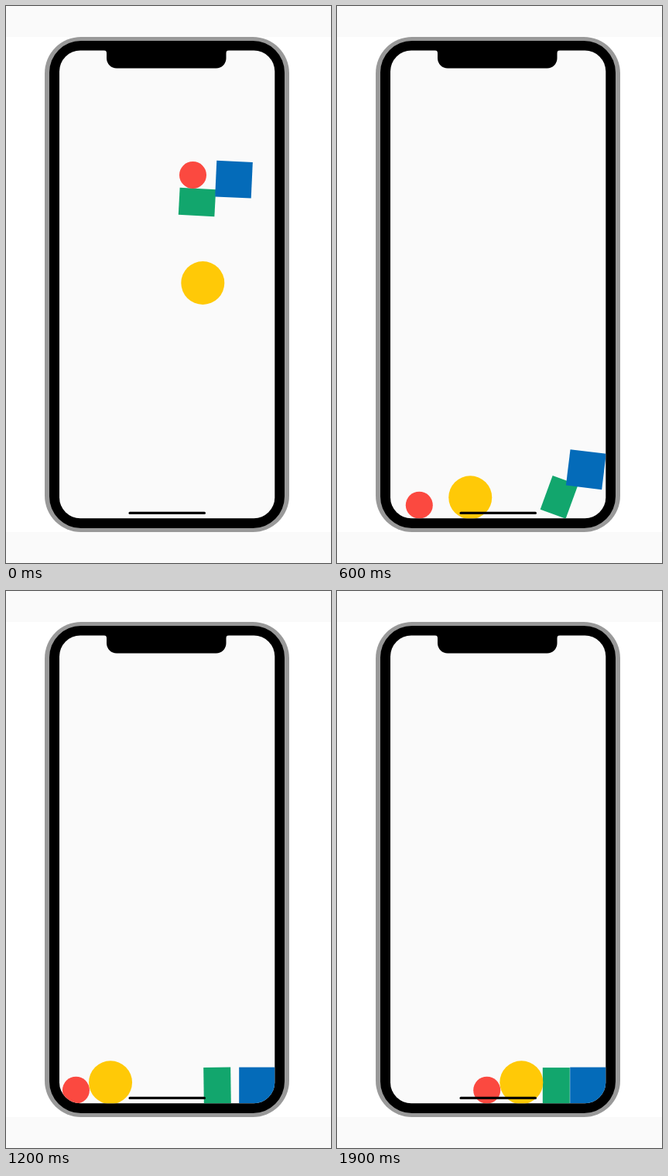
Recreate the animation shown at these times as an HTML page with a canvas. Size 420 by 720 pixels, loop 2000 ms.

```html
<!DOCTYPE html>
<html lang="en">
<head>
<meta charset="utf-8">
<title>Falling shapes</title>
<style>
  html, body { margin: 0; width: 100%; height: 100%; overflow: hidden; background: #fff; }
  canvas { display: block; width: 420px; height: 720px; }
</style>
</head>
<body>
<canvas id="stage" width="420" height="720"></canvas>
<script>
const ctx = document.getElementById("stage").getContext("2d");
const LOOP = 2000, STEP = 100;
const PAPER = "#fafafa";
const LEFT = 69, RIGHT = 347.8, FLOOR = 662.7;
const SIDE = 46.6, SHORT = 35, SMALL = 17.5, BIG = 28;

// Progress from a to b, clamped; the power shapes the start
const ramp = (t, a, b, power = 1) =>
  Math.min(1, Math.max(0, (t - a) / (b - a))) ** power;
const easeOut = (t, a, b) => 1 - (1 - ramp(t, a, b)) ** 2;

// Distance fallen after t steps
const fall = t => 132 * t + 15.3 * t * t;

// Half the extent of a turned block along the axis its width w lies on
function reach(w, h, degrees) {
  const a = degrees * Math.PI / 180;
  return (w * Math.abs(Math.cos(a)) + h * Math.abs(Math.sin(a))) / 2;
}

// The balls roll as a pair: slowing into the left wall, then away with the tilt
function rollX(t) {
  const d = t - 10.35, wall = LEFT + SMALL;
  return Math.min(wall + (d < 0 ? 2.34 : 1.445) * d * d, 193.7);
}

function redPose(t) {
  const rest = FLOOR - SMALL, hit = 543.7;
  const y = t < 2 ? 218.5 + fall(t) : hit + (rest - hit) * easeOut(t, 2, 4.55);
  if (t >= 8) return [rollX(t), y];
  const bounce = Math.max(0, t - 4);
  const x = 241.5 + 14 * ramp(t, 0, 2) - 162.9 * ramp(t, 2, 4)
    + 12 * bounce - 2.575 * bounce ** 2;
  return [x, y];
}

function yellowPose(t) {
  const y = Math.min(358 + fall(t), FLOOR - BIG + 0.6);
  if (t >= 8) return [rollX(t) + 44.6, y];
  const slide = Math.max(0, t - 2);
  return [254.3 + 39.3 * ramp(t, 0, 2) - 41.3 * slide + 2.74 * slide ** 2, y];
}

function greenPose(t) {
  const push = ramp(t, 18, 19);
  const angle = 3 + 47.7 * ramp(t, 0, 2, 2) + 66.3 * ramp(t, 2, 4)
    - 27.8 * ramp(t, 4, 8, 2) + 0.8 * push;
  const x = 247 + 64.8 * ramp(t, 0, 2) - 10.6 * ramp(t, 2, 4)
    - 28.2 * ramp(t, 4, 8) + 10.3 * push;
  const y = Math.min(253.5 + 1.025 * fall(t), FLOOR - reach(SHORT, SIDE, angle));
  return [x, y, angle];
}

function bluePose(t) {
  const angle = 2.6 * (1 - ramp(t, 0, 2)) + 9.3 * (ramp(t, 2, 4) - ramp(t, 4, 8, 2));
  const x = Math.min(294.5 + 15.3 * t, RIGHT - reach(SIDE, SIDE, angle));
  const y = 224.2 + 0.858 * fall(Math.min(t, 2))
    + 82.7 * easeOut(t, 2, 4) + 53 * ramp(t, 4, 8, 2);
  return [x, y, angle];
}

function fillBox(x, y, w, h, r, color) {
  ctx.fillStyle = color;
  ctx.beginPath();
  ctx.roundRect(x, y, w, h, r);
  ctx.fill();
}

function ball([x, y], r, color) {
  ctx.fillStyle = color;
  ctx.beginPath();
  ctx.arc(x, y, r, 0, Math.PI * 2);
  ctx.fill();
}

function block([x, y, angle], w, h, color) {
  ctx.save();
  ctx.translate(x, y);
  ctx.rotate(angle * Math.PI / 180);
  ctx.fillStyle = color;
  ctx.fillRect(-w / 2, -h / 2, w, h);
  ctx.restore();
}

function drawNotch() {
  const left = 130, right = 284.5, top = 57, bottom = 80.5, r = 13, flare = 4;
  ctx.fillStyle = "#000";
  ctx.beginPath();
  ctx.moveTo(left - flare, top);
  ctx.quadraticCurveTo(left, top, left, top + flare);
  ctx.arcTo(left, bottom, left + r, bottom, r);
  ctx.arcTo(right, bottom, right, bottom - r, r);
  ctx.lineTo(right, top + flare);
  ctx.quadraticCurveTo(right, top, right + flare, top);
  ctx.fill();
}

function draw(t) {
  ctx.fillStyle = PAPER;
  ctx.fillRect(0, 0, 420, 720);
  ctx.fillStyle = "#fff";
  ctx.fillRect(0, 40, 420, 640);

  fillBox(50, 40, 316, 640, 47, "#999");
  fillBox(56, 45, 304, 630, 41, "#000");
  fillBox(LEFT, 57.5, 278.3, 604.7, 27, PAPER);

  ctx.save();
  ctx.beginPath();
  ctx.roundRect(LEFT, 57.5, 278.3, 604.7, 27);
  ctx.clip();
  block(greenPose(t), SIDE, SHORT, "#12a66d");
  block(bluePose(t), SIDE, SIDE, "#046bb9");
  ball(redPose(t), SMALL, "#fb4940");
  ball(yellowPose(t), BIG, "#ffc907");
  ctx.restore();

  drawNotch();
  fillBox(158.5, 653.8, 99.5, 3.2, 1.6, "#000");
}

const start = performance.now();
function tick() {
  const elapsed = (performance.now() - start) % LOOP;
  draw(Math.floor(elapsed / STEP));
  requestAnimationFrame(tick);
}
tick();
</script>
</body>
</html>
```
